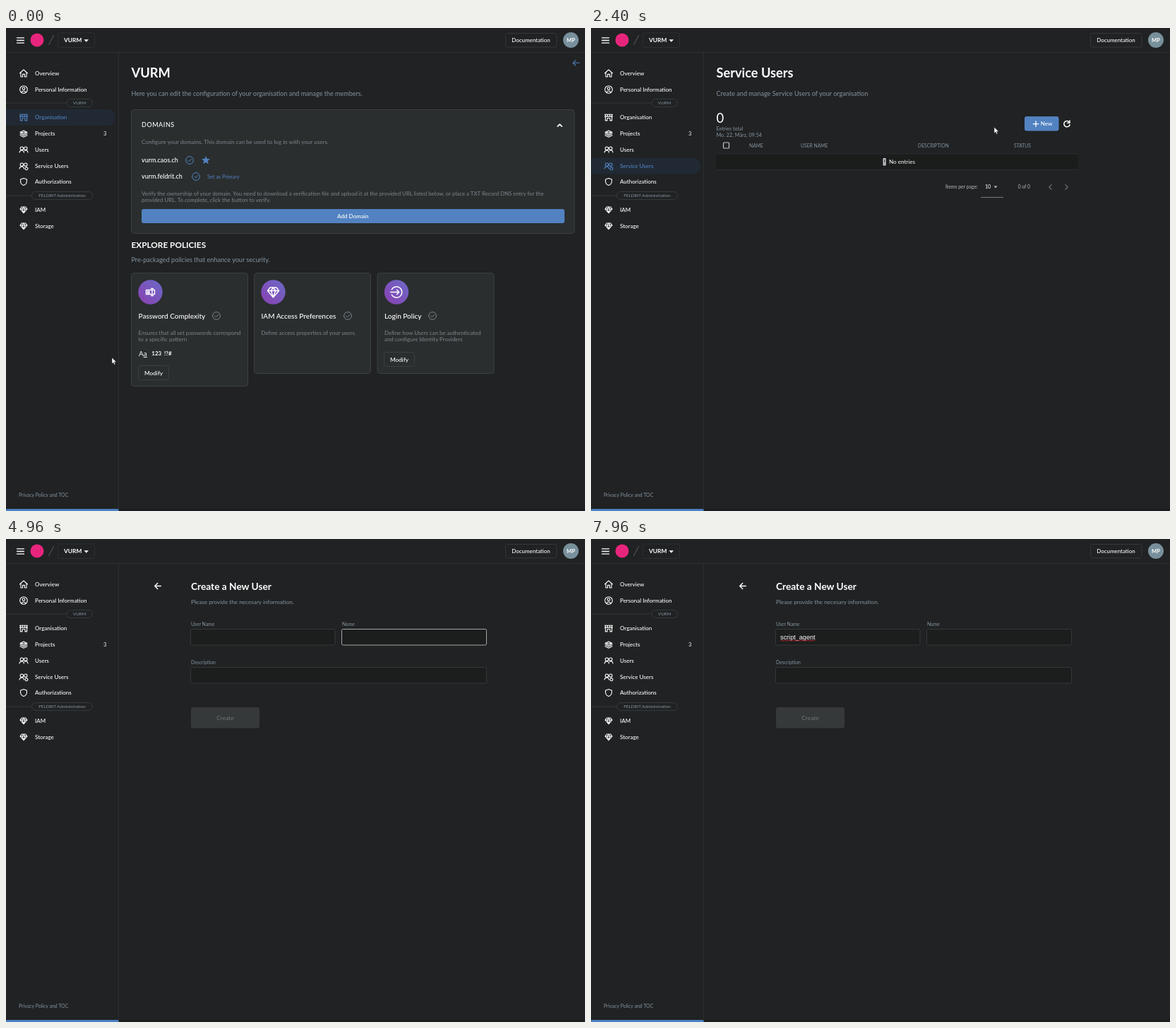
Recreate the animation shown at these times as an HTML page. Size 820x683 px, loop 8000 ms.

```html
<!DOCTYPE html>
<html lang="en">
<head>
<meta charset="utf-8">
<title>Create a service user</title>
<style>
  html, body { margin: 0; width: 100%; height: 100%; overflow: hidden; background: #202223; }
  svg { display: block; width: 820px; height: 683px; font-family: Lato, sans-serif; }
  text { white-space: pre; }
  .line { fill: none; stroke: currentColor; stroke-width: 1.1; stroke-linecap: round; stroke-linejoin: round; }
</style>
</head>
<body>
<svg id="stage" viewBox="0 0 820 683" xmlns="http://www.w3.org/2000/svg"></svg>
<script>
const LOOP = 8000, STEP = 40;
const WHITE = '#fff', GREY = '#8795a1', MUTED = '#7d868c', BLUE = '#5282c1';
const BG = '#202223', CARD = '#2a2e2f', EDGE = '#3b4043', DARK_EDGE = '#34383a';
const TYPED = 'script_agent';
const KEY_TIMES = [6200, 6320, 6440, 6560, 6640, 6720, 6800, 6960, 7440, 7520, 7600, 7680];

// y is the middle of the capitals
const text = (x, y, size, str, fill = WHITE, extra = '') =>
  `<text x="${x}" y="${y + size * .35}" font-size="${size}" fill="${fill}" ${extra}>${str}</text>`;
const BOLD = 'font-weight="700"', MEDIUM = 'font-weight="500"', MID = 'text-anchor="middle"';
const box = (x, y, w, h, fill, stroke = 'none', r = 3, extra = '') =>
  `<rect x="${x}" y="${y}" width="${w}" height="${h}" rx="${r}" fill="${fill}" stroke="${stroke}" ${extra}/>`;
const line = (x, y, d, color = WHITE, width = 1.1) =>
  `<path class="line" transform="translate(${x} ${y})" d="${d}" style="color:${color};stroke-width:${width}"/>`;
const ring = (x, y, r) => `M${x - r} ${y}a${r} ${r} 0 1 1 ${2 * r} 0a${r} ${r} 0 1 1 ${-2 * r} 0`;

const USERS = ring(-2.6, -1.8, 2.2) + ring(2.8, -1.8, 2.2) + 'M-6 4Q-5.5 1-2.6 1T.4 4';
const ICONS = {
  home: 'M-5.5 0L0-5L5.5 0M-4-1V5H-1.4V1.4H1.4V5H4V-1',
  person: ring(0, 0, 5.3) + ring(0, -1.4, 1.8) + 'M-3.4 3.8Q0 .2 3.4 3.8',
  shop: 'M-5.5-4.2H5.5M-5.5-1.4H5.5M-4.6-4.2V4.4H-2V1H2V4.4H4.6V-4.2M-1.7-4.2V-1.4M1.7-4.2V-1.4',
  layers: 'M-5-2L0-4.5L5-2L0 .5ZM-5 0L0 2.5L5 0M-5 2.2L0 4.7L5 2.2M-3-2H3',
  users: USERS + 'M1.5 1.3Q5.6 0 6 4',
  service: USERS + ring(4, 3.8, 1.9),
  shield: 'M0-5L4.4-3.4V0Q4 3.6 0 5Q-4 3.6-4.4 0V-3.4Z',
  gem: 'M-5-1L-2.8-4H2.8L5-1L0 4.6ZM-5-1H5M-2-1L0 4.4L2-1L0-4L-2-1'
};
const check = (x, y, color) => line(x, y, ring(0, 0, 5.4) + 'M-2.3.2L-.6 1.9L2.6-1.7', color, 1);

const ROWS = [
  ['home', 'Overview', 64], ['person', 'Personal Information', 87],
  ['shop', 'Organisation', 126.5], ['layers', 'Projects', 149.5], ['users', 'Users', 172],
  ['service', 'Service Users', 195], ['shield', 'Authorizations', 217.5],
  ['gem', 'IAM', 257], ['gem', 'Storage', 280]
];
const ORG = 2, SERVICE = 5;

const pill = (x, y, w, str) =>
  `<path d="M0 ${y}H${x}" stroke="${DARK_EDGE}"/>` +
  box(x, y - 5.5, w, 11, 'none', EDGE, 5.5, 'stroke-width=".8"') +
  text(x + w / 2, y, 6.3, str, GREY, MID);

const sidebar = () =>
  ROWS.map(([icon, label, y], i) => `<g id="row${i}">` +
    box(-12, y - 11.4, 167, 22.8, 'none', 'none', 11.4) +
    `<g>${line(25, y, ICONS[icon], 'inherit')}${text(41, y, 8, label, 'currentColor', MEDIUM)}</g></g>`).join('') +
  text(138, 149.5, 7.5, '3') + pill(86, 106, 36.5, 'VURM') + pill(36.5, 237, 86, 'FELDRIT Administration') +
  text(18, 660.5, 6.95, 'Privacy Policy and TOC', GREY);

const header = () =>
  `<path d="M0 34.5H820M159.5 34V683" stroke="#2d3133"/>` +
  line(20.5, 17.5, 'M-5-3.7H5M-5 0H5M-5 3.7H5', WHITE, 1.3) +
  `<circle cx="44" cy="17" r="9.5" fill="#e8257d"/>` +
  line(64, 17, 'M3.5-6.5L-3.5 6.5', '#50565a') +
  box(73.5, 7, 52, 20.5, 'none', '#2d3133') + text(82, 17.2, 8.4, 'VURM', WHITE, BOLD) +
  `<path d="M110.5 16.2h6.5l-3.25 3.6z" fill="#fff"/>` +
  box(707.5, 7.5, 72.5, 19.5, 'none', DARK_EDGE) + text(743.5, 17.2, 7.95, 'Documentation', WHITE, MID + ' ' + MEDIUM) +
  `<circle cx="800" cy="17" r="11" fill="#78909c"/>` + text(800, 17.3, 7.6, 'MP', WHITE, MID + ' ' + BOLD);

const policy = (x, h, title, checkX, lines, glyph) =>
  box(x, 346.5, 165, h, CARD, EDGE, 3.5) +
  `<circle cx="${x + 27}" cy="373.5" r="17.2" fill="url(#purple)"/>` +
  line(x + 27, 373.5, glyph, WHITE, 1.4) +
  text(x + 10, 407, 10, title, WHITE, MEDIUM) + check(checkX, 407, MUTED) +
  lines.map((s, i) => text(x + 10, 430.8 + i * 9.2, 7.93, s, MUTED)).join('');
const modify = (x, y) => box(x + .5, y - 10.5, 43, 20, 'none', EDGE) + text(x + 22, y, 8.3, 'Modify', WHITE, MID + ' ' + MEDIUM);

const orgPage = () =>
  text(177.5, 63.5, 18.3, 'VURM', WHITE, BOLD) +
  text(177.5, 92.5, 9.03, 'Here you can edit the configuration of your organisation and manage the members.', GREY) +
  line(807.5, 49.3, 'M4.5 0H-4.5M-.8-3.7L-4.5 0L-.8 3.7', BLUE) +
  box(177.5, 115.5, 627.5, 175, CARD, EDGE, 4) +
  text(192, 137.2, 9, 'DOMAINS', WHITE, MEDIUM + ' letter-spacing=".55"') +
  line(784.2, 137.5, 'M-3 1.6L0-1.4L3 1.6', WHITE, 1.6) +
  text(192, 161.5, 8.12, 'Configure your domains. This domain can be used to log in with your users.', MUTED) +
  text(192, 187, 9, 'vurm.caos.ch', WHITE, MEDIUM) + check(260, 187, BLUE) +
  `<path transform="translate(283 187)" fill="${BLUE}" d="M0-6L1.7-2L6-1.7L2.7 1.1L3.7 5.3L0 3L-3.7 5.3L-2.7 1.1L-6-1.7L-1.7-2Z"/>` +
  text(192, 210, 9, 'vurm.feldrit.ch', WHITE, MEDIUM) + check(269, 210, BLUE) +
  text(285, 210, 7.3, 'Set as Primary', BLUE) +
  text(192, 234, 7.88, 'Verify the ownership of your domain. You need to download a verification file and upload it at the provided URL listed below, or place a TXT Record DNS entry for the', MUTED) +
  text(192, 243.5, 7.88, 'provided URL. To complete, click the button to verify.', MUTED) +
  box(192, 256, 599, 20, BLUE) + text(491.3, 266.3, 8.1, 'Add Domain', WHITE, MID + ' ' + MEDIUM) +
  text(177.5, 307, 11.8, 'EXPLORE POLICIES', WHITE, BOLD) +
  text(177.5, 328, 9.08, 'Pre-packaged policies that enhance your security.', GREY) +
  policy(177.5, 160, 'Password Complexity', 298, ['Ensures that all set passwords correspond', 'to a specific pattern'],
    'M1-3H-6V3H1M4-3H6V3H4M2.5-5V5M1-5H4M1 5H4M-4-1H-1.5V1.2H-4Z') +
  text(188, 460.5, 10, 'A<tspan text-decoration="underline">a</tspan>') +
  text(206.3, 460.5, 8, '123', WHITE, BOLD) + text(224, 460.5, 8, '!?#', WHITE, BOLD) + modify(187, 488) +
  policy(351.5, 142, 'IAM Access Preferences', 484, ['Define access properties of your users.'],
    'M-8-2L-4.5-6.5H4.5L8-2L0 7.5ZM-8-2H8M-3.2-2L0 7L3.2-2L0-6.5L-3.2-2') +
  policy(526, 142, 'Login Policy', 604, ['Define how Users can be authenticated', 'and configure Identity Providers'],
    'M-6.8-3.5A7.7 7.7 0 1 1-6.8 3.5M-8.5 0H3.5M.5-3.2L3.7 0L.5 3.2') + modify(535, 469);

const servicePage = () =>
  text(177.5, 63.5, 18.2, 'Service Users', WHITE, BOLD) +
  text(177.5, 92.5, 9.1, 'Create and manage Service Users of your organisation', GREY) +
  text(177.5, 127.5, 18.4, '0') +
  text(177.5, 142.3, 7.15, 'Entries total', GREY) + text(177.5, 151.3, 7.25, 'Mo. 22. März, 09:54', GREY) +
  box(614, 125, 48.5, 20.5, BLUE) + line(630, 135.7, 'M-3.7 0H3.7M0-3.7V3.7', WHITE, 1.3) +
  text(636.7, 135.3, 8.1, 'New', WHITE, MEDIUM) +
  line(674, 135.5, 'M3.2-2.7A4.2 4.2 0 1 0 4.1 1.2M4-4.5V-1.2H.8', WHITE, 1.5) +
  `<g id="tableHead">` + box(187.5, 162, 8, 8, 'none', '#c4c8ca', 1, 'stroke-width="1.2"') +
  [[224, 'NAME'], [297, 'USER NAME'], [463, 'DESCRIPTION'], [599, 'STATUS']]
    .map(([x, s]) => text(x, 166.5, 6.75, s, GREY)).join('') + `</g>` +
  `<g id="tableBody">` + box(177.5, 178, 512, 22.5, '#1b1d1d', 'none', 0) +
  `<path d="M177.5 177.8H689.5M177.5 200.5H689.5" stroke="#303436" stroke-width=".7"/>` +
  box(413.6, 184, 4, 10.5, '#d5d8da', 'none', 1) + line(415.6, 189, 'M0-3V1M0 3.2V3.3', '#34383a', 1.2) +
  text(422, 189.3, 8.1, 'No entries') +
  text(502, 225, 6.85, 'Items per page:', '#b6bcc0') + text(558, 225, 7, '10', WHITE, MEDIUM) +
  `<path d="M570.5 223.5h5l-2.5 2.7z" fill="#c4c8ca"/><path d="M552 239.5h32" stroke="#8d9498" stroke-width=".8"/>` +
  text(604.7, 225, 6.7, '0 of 0', '#b6bcc0') +
  line(650.5, 225, 'M1.7-3.4L-1.7 0L1.7 3.4', '#70777b') + line(673.5, 225, 'M-1.7-3.4L1.7 0L-1.7 3.4', '#70777b') + `</g>`;

const field = (id, x, y, w, label) =>
  text(x + .5, y - 6, 6.85, label, GREY) + box(x, y + .5, w, 22.5, 'rgba(0,0,0,.13)', DARK_EDGE, 2, `id="${id}"`);
const formPage = () =>
  line(215, 66.5, 'M4.3 0H-4.3M-.3-4L-4.3 0L-.3 4', WHITE, 1.4) +
  text(262, 67.5, 13.7, 'Create a New User', WHITE, BOLD) +
  text(262, 89.3, 8.2, 'Please provide the necesary information.', GREY) +
  field('userField', 261.5, 127, 204.5, 'User Name') + field('nameField', 475.5, 127, 205, 'Name') +
  field('descField', 261.5, 181, 419, 'Description') +
  box(262, 238, 97, 29.5, '#36393a', 'none', 3) + text(310.5, 253, 8.4, 'Create', '#72777a', MID) +
  text(268, 138.7, 9.1, '', WHITE, 'id="typed" style="font-family:\'Liberation Sans\',Arial,sans-serif"') +
  `<path id="squiggle" d="M268 143${'l1.3 1.1l1.3-1.1'.repeat(19)}" fill="none" stroke="#e0313a" stroke-width=".8"/>`;

const overlay = () =>
  `<g id="tooltip">${box(24, 214, 107, 13.5, '#606465', 'none', 2)}${text(77.5, 220.7, 5.85, 'Show service users of your organisation', WHITE, MID)}</g>` +
  `<path id="click" d="M639.5 132.5a5.5 4 0 0 1 11 0M639.5 136.5h2.5m2 0h2.500m2 0h2.500" fill="none" stroke="#b81830" stroke-width="1.1"/>` +
  `<path id="arrow" d="M0 0V9L2.1 7.1L3.5 10.2L5 9.5L3.6 6.5H6.4Z" fill="#fff" stroke="#111" stroke-width=".5"/>` +
  `<path id="hand" d="M-1 0Q0-1.6 1 0V4L4.5 5Q5.7 5.4 5.3 7.5L4.4 11H-.8L-3.4 6.8Q-3.2 5.4-2 6.2L-1 7.2Z" fill="#fff" stroke="#111" stroke-width=".5"/>`;

const stage = document.getElementById('stage');
stage.innerHTML =
  `<defs><linearGradient id="purple" x1="0" y1="1" x2="1" y2="0"><stop stop-color="#8a3fb0"/><stop offset="1" stop-color="#6b6bc8"/></linearGradient></defs>` +
  box(0, 0, 820, 683, BG, 'none', 0) +
  `<g id="org">${orgPage()}</g><g id="service">${servicePage()}</g><g id="form">${formPage()}</g>` +
  sidebar() + header() + box(160, 680, 660, 3, '#1b1d1e', 'none', 0) +
  box(160, 680, 550, 3, '#484b4d', 'none', 1, 'id="scroll"') + box(0, 680, 159.5, 5, '#4c80c4', 'none', 1.5) + overlay();

const el = id => document.getElementById(id);
const show = (id, opacity) => {
  el(id).style.display = opacity ? '' : 'none';
  el(id).setAttribute('opacity', +opacity);
};
const between = (t, a, b) => t >= a && t < b;
const progress = (t, start, length) => Math.min(1, Math.max(0, (t - start) / length));

const PATH = [[440, 150, 466], [1200, 99.7, 193.7], [1680, 99.7, 193.7], [2400, 571, 140], [3160, 645.5, 134.7], [LOOP, 645.5, 134.7]];
function pointer(t) {
  if (t <= PATH[0][0]) return PATH[0].slice(1);
  const i = PATH.findIndex(p => p[0] >= t), [t0, x0, y0] = PATH[i - 1], [t1, x1, y1] = PATH[i];
  const p = progress(t, t0, t1 - t0), e = p * p * (3 - 2 * p);
  return [x0 + (x1 - x0) * e, y0 + (y1 - y0) * e];
}

function render(t) {
  const [x, y] = pointer(t);
  const swap = progress(t, 1720, 280), slide = progress(t, 3800, 350), enter = slide ** 1.57;
  const leaving = t >= 3800;

  show('org', 1 - swap);
  show('service', leaving ? (1 - slide) ** 1.25 : swap);
  show('tableHead', !leaving);
  el('tableBody').setAttribute('transform', `translate(0 ${leaving ? -23 : 0})`);
  show('form', leaving ? .5 + .5 * enter : 0);
  el('form').setAttribute('transform', `translate(${132 * (1 - enter)} 0)`);
  show('scroll', between(t, 3800, 4160));

  const active = t < 1720 ? ORG : leaving ? -1 : SERVICE;
  ROWS.forEach(([, , rowY], i) => {
    const hover = x < 155 && Math.abs(y - rowY) < 11.4;
    const row = el('row' + i);
    row.firstChild.setAttribute('fill', i === active ? '#212a34' : hover ? '#2c3031' : 'none');
    row.lastChild.style.color = i === active ? BLUE : WHITE;
  });

  show('tooltip', between(t, 1160, 1760));
  show('click', between(t, 3920, 4200));
  const overLink = t < 1800 && x < 155 && y < 291 || t >= 2880;
  show('arrow', !overLink);
  show('hand', overLink && t < 3840);
  for (const id of ['arrow', 'hand']) el(id).setAttribute('transform', `translate(${x} ${y})`);

  el('nameField').setAttribute('stroke', between(t, 3880, 5720) ? '#a4a8aa' : DARK_EDGE);
  el('userField').setAttribute('stroke', between(t, 5760, 7920) ? '#8b9092' : DARK_EDGE);
  el('typed').textContent = TYPED.slice(0, KEY_TIMES.filter(k => t >= k).length);
  show('squiggle', t >= 7920);
}

const began = performance.now();
function tick() {
  render(Math.floor((performance.now() - began) % LOOP / STEP) * STEP);
  requestAnimationFrame(tick);
}
tick();
</script>
</body>
</html>
```
